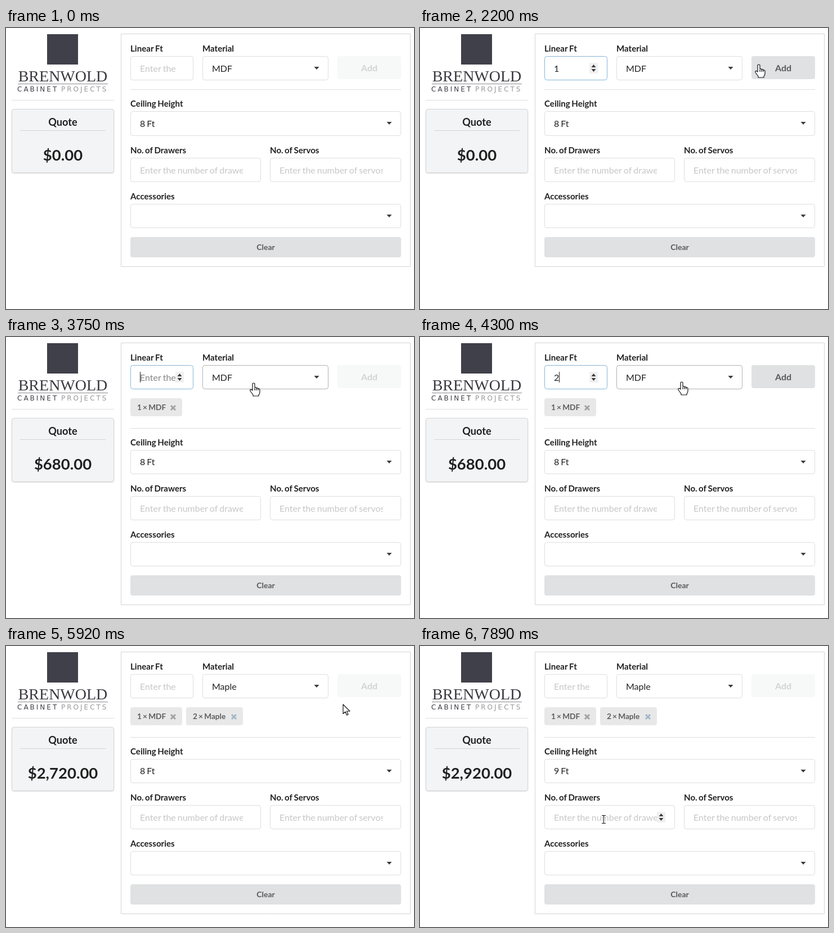
An HTML page with a canvas that plays this animation: 725 by 500 pixels, repeating every 8000 ms.

```html
<!DOCTYPE html>
<html lang="en">
<head>
<meta charset="utf-8">
<title>Cabinet quote</title>
<style>
html, body { margin: 0; width: 100%; height: 100%; overflow: hidden; background: #fff; }
canvas { display: block; }
</style>
</head>
<body>
<canvas id="stage" width="725" height="500"></canvas>
<script>
const ctx = document.getElementById('stage').getContext('2d');
const LOOP = 8000, TICK = 109.6, LAST = 72;
const INK = 'rgba(0,0,0,.87)', SOFT = 'rgba(0,0,0,.6)';
const LINE = 'rgba(34,36,38,.15)', HOVER = 'rgba(34,36,38,.35)', FOCUS = '#85b7d9', OPEN = '#96c8da';
const WOODS = ['MDF', 'Maple', 'Cherry', 'Walnut'];
const HEIGHTS = ['8 Ft', '9 Ft', '10 Ft'];

// Pointer hotspot: tick, x, y
const PATH = [
  [1, 400, 376], [4, 345, 248], [6, 305, 168], [8, 274, 83], [9, 274, 80],
  [14, 276, 80], [16, 370, 84], [20, 602, 65], [21, 624, 74], [24, 624, 74],
  [26, 450, 84], [28, 290, 80], [29, 274, 84], [32, 274, 84], [33, 375, 83],
  [34, 440, 82], [39, 465, 80], [42, 465, 80], [43, 470, 95], [46, 495, 164],
  [47, 495, 164], [50, 638, 78], [53, 638, 78], [55, 560, 130], [58, 400, 226],
  [59, 381, 231], [62, 381, 231], [64, 368, 245], [66, 340, 277], [67, 332, 288],
  [70, 332, 288], [72, 326, 308]
];
const CLICKS = [9, 22, 29, 40, 46, 52, 59, 69];

const HAND = new Path2D('M-2 13V2Q-2 0 0 0Q2 0 2 2V8Q5 7 5 9Q8 8 8 10Q11 9.5 11 12V16Q11 19 9 21V23H-1V21L-6 14Q-7 11 -4 11.5Z');
const ARROW = new Path2D('M0 0V16.5L4 13L6.5 19L9 18L6.5 12H12Z');

const lato = (size, weight = 400) => `${weight} ${size}px Lato, sans-serif`;
const between = (v, a, b) => v >= a && v < b;
const inside = (p, b) => p && between(p.x, b.x, b.x + b.w) && between(p.y, b.y, b.y + b.h);

function text(str, x, y, font, color = INK, align = 'left') {
  ctx.font = font;
  ctx.fillStyle = color;
  ctx.textAlign = align;
  ctx.fillText(str, x, y);
}

function fill(x, y, w, h, color, r = 0) {
  ctx.fillStyle = color;
  ctx.beginPath();
  ctx.roundRect(x, y, w, h, r);
  ctx.fill();
}

function frame(b, color, r = 4) {
  ctx.strokeStyle = color;
  ctx.lineWidth = 1;
  ctx.beginPath();
  ctx.roundRect(b.x + .5, b.y + .5, b.w - 1, b.h - 1, r);
  ctx.stroke();
}

function triangle(x, y, half, height) {
  ctx.fillStyle = '#3c3c3f';
  ctx.beginPath();
  ctx.moveTo(x - half, y);
  ctx.lineTo(x + half, y);
  ctx.lineTo(x, y + height);
  ctx.fill();
}

const label = (str, x, y) => text(str, x, y, lato(15.1, 700));

function pointerAt(n) {
  if (n < 1) return null;
  const i = PATH.findIndex(k => k[0] >= n);
  const b = PATH[i], a = PATH[Math.max(0, i - 1)];
  const f = b[0] === a[0] ? 0 : (n - a[0]) / (b[0] - a[0]);
  return { x: a[1] + (b[1] - a[1]) * f, y: a[2] + (b[2] - a[2]) * f };
}

function input(b, base, hint, value, p, focused, caret) {
  const right = b.x + b.w - 32;
  fill(b.x, b.y, b.w, b.h, '#fff', 4);
  frame(b, focused ? FOCUS : LINE);
  ctx.save();
  ctx.beginPath();
  ctx.rect(b.x + 17, b.y, right - b.x - 17, b.h);
  ctx.clip();
  const pale = focused || caret ? 'rgba(115,115,115,.87)' : 'rgba(191,191,191,.87)';
  text(value || hint, b.x + 17, base, lato(16), value ? INK : pale);
  ctx.restore();
  if (caret) fill(b.x + 17 + (value ? 9 : 0), base - 16, 1, 19, '#222');
  if (inside(p, b) || focused) {
    fill(right, base - 16, 15, 19, '#f0f0f0');
    triangle(right + 7.5, base - 8, 4, -5);
    triangle(right + 7.5, base - 5, 4, 5);
  }
}

function dropdown(b, base, value, p, open) {
  fill(b.x, b.y, b.w, b.h, '#fff', 4);
  frame(b, open ? OPEN : inside(p, b) ? HOVER : LINE);
  text(value, b.x + 17, base, lato(16), open ? 'rgba(0,0,0,.7)' : INK);
  triangle(b.x + b.w - 21, b.y + 19, 4.5, 5);
}

function menu(b, items, chosen, p) {
  const top = b.y + b.h - 1, m = { x: b.x, y: top, w: b.w, h: items.length * 37 + 1 };
  ctx.save();
  ctx.shadowColor = 'rgba(34,36,38,.2)';
  ctx.shadowBlur = 3;
  ctx.shadowOffsetY = 2;
  fill(m.x, m.y, m.w, m.h, '#fff', [0, 0, 4, 4]);
  ctx.restore();
  frame(m, OPEN, [0, 0, 4, 4]);
  items.forEach((name, i) => {
    const row = { x: m.x + 1, y: top + i * 37, w: m.w - 2, h: 37 };
    const on = name === chosen, hot = inside(p, row);
    fill(row.x, row.y, row.w, row.h, hot ? '#f2f2f2' : on ? '#f7f7f7' : '#fff');
    text(name, b.x + 17, row.y + 24, lato(14, on ? 700 : 400), on ? 'rgba(0,0,0,.95)' : INK);
  });
  return m;
}

function tag(str, x, w, cross) {
  fill(x, 109, w, 32, '#e8e8e8', 4);
  text(str, x + 12, 130, lato(13.7, 700), SOFT);
  const cx = x + w - 16, cy = 126;
  ctx.strokeStyle = cross;
  ctx.lineWidth = 3;
  ctx.beginPath();
  for (const s of [-1, 1]) {
    ctx.moveTo(cx - 4, cy - 4 * s);
    ctx.lineTo(cx + 4, cy + 4 * s);
  }
  ctx.stroke();
}

function button(b, str, base, size, hot, disabled) {
  ctx.globalAlpha = disabled ? .25 : 1;
  fill(b.x, b.y, b.w, b.h, hot && !disabled ? '#cacbcd' : '#e0e1e2', 4);
  text(str, b.x + b.w / 2, base, lato(size, 700), SOFT, 'center');
  ctx.globalAlpha = 1;
}

function brand() {
  fill(73, 11, 55, 54, '#40404a');
  text('BRENWOLD', 101, 95, '28px "Liberation Serif", serif', '#3a3a42', 'center');
  fill(21, 99, 160, 1, '#8c8c90');
  ctx.letterSpacing = '3px';
  text('CABINET', 20, 113, '12px "DejaVu Sans", sans-serif', '#3f3f47');
  text('PROJECTS', 98, 113, '12px "DejaVu Sans", sans-serif', '#98989c');
  ctx.letterSpacing = '0px';
  fill(10, 128, 182, 1, '#dededf');
}

function quote(amount) {
  ctx.save();
  ctx.shadowColor = 'rgba(34,36,38,.15)';
  ctx.shadowBlur = 2;
  ctx.shadowOffsetY = 1;
  fill(10, 144, 182, 114, '#f3f4f5', 4);
  ctx.restore();
  frame({ x: 10, y: 144, w: 182, h: 114 }, '#d4d4d5');
  text('Quote', 101, 174, lato(18.2, 700), INK, 'center');
  fill(25, 182, 152, 1, '#d4d4d5');
  text(amount, 101, 236, lato(27.5, 700), INK, 'center');
}

function pointer(p, kind, clicked) {
  ctx.save();
  ctx.translate(Math.round(p.x), Math.round(p.y));
  if (clicked) {
    ctx.fillStyle = 'rgba(255,255,0,.5)';
    ctx.beginPath();
    ctx.arc(0, 0, 10, 0, 7);
    ctx.fill();
  }
  if (kind === 'beam') {
    fill(0, -7, 1, 15, '#111');
    for (const y of [-7, 7]) {
      fill(-3, y, 3, 1, '#111');
      fill(1, y, 3, 1, '#111');
    }
  } else {
    const shape = kind === 'hand' ? HAND : ARROW;
    ctx.fillStyle = '#fff';
    ctx.strokeStyle = '#111';
    ctx.lineWidth = 1.2;
    ctx.lineJoin = 'round';
    ctx.fill(shape);
    ctx.stroke(shape);
    if (kind === 'hand') {
      ctx.beginPath();
      for (const x of [2, 5, 8]) {
        ctx.moveTo(x, 9);
        ctx.lineTo(x, 13);
      }
      ctx.stroke();
    }
  }
  ctx.restore();
}

function draw(t) {
  const n = Math.min(LAST, Math.floor((t + 20) / TICK));
  const p = pointerAt(n);
  const tags = n >= 53 ? 2 : n >= 23 ? 1 : 0;
  const dy = tags ? 52 : 0, dTop = tags ? 53 : 0;
  const amount = between(n, 13, 23) ? '1' : between(n, 37, 53) ? '2' : '';
  const wood = n >= 46 ? 'Maple' : 'MDF';
  const height = n >= 69 ? '9 Ft' : '8 Ft';
  const woodOpen = between(n, 41, 47), heightOpen = between(n, 60, 70);
  const focused = between(n, 10, 23) || between(n, 30, 40);
  const since = n >= 37 ? 37 : n >= 30 ? 30 : n >= 13 ? 13 : 9;
  const caret = (focused || n === 9) && (n - since) * TICK % 1060 < 530;
  const price = n >= 69 ? '$2,920.00' : tags === 2 ? '$2,720.00' : tags ? '$680.00' : '$0.00';

  const feet = { x: 221, y: 50, w: 112, h: 43 };
  const material = { x: 349, y: 50, w: 224, h: 43 };
  const add = { x: 589, y: 50, w: 113, h: 41 };
  const ceiling = { x: 221, y: 148 + dTop, w: 481, h: tags ? 43 : 44 };
  const drawers = { x: 221, y: 231 + dy, w: 232, h: 43 };
  const servos = { x: 469, y: 231 + dy, w: 233, h: 43 };
  const extras = { x: 221, y: 313 + dy, w: 481, h: 43 };
  const clear = { x: 221, y: 372 + dy, w: 481, h: 36 };
  const free = heightOpen || woodOpen ? null : p;

  fill(0, 0, 725, 500, '#fff');
  brand();
  ctx.wordSpacing = '-1.2px';
  quote(price);
  frame({ x: 204, y: 10, w: 515, h: 415 + dy }, '#d4d4d5', 0);

  label('Linear Ft', 221, 42);
  label('Material', 349, 42);
  input(feet, 78, 'Enter the linear feet', amount, p, focused, caret);
  dropdown(material, 78, wood, p, woodOpen);
  button(add, 'Add', 77, 16, inside(p, add) && n > 20, !amount);
  if (tags) tag('1 × MDF', 221, 92, '#a2a2a2');
  if (tags > 1) tag('2 × Maple', 320, 101, '#a3b7c8');
  fill(221, 109 + dTop, 481, 1, '#dededf');

  label('Ceiling Height', 221, 140 + dTop);
  dropdown(ceiling, 176 + dy, height, free || (heightOpen ? p : null), heightOpen);
  label('No. of Drawers', 221, 223 + dy);
  label('No. of Servos', 469, 223 + dy);
  input(drawers, 259 + dy, 'Enter the number of drawers', '', free);
  input(servos, 259 + dy, 'Enter the number of servos', '', free);
  label('Accessories', 221, 305 + dy);
  dropdown(extras, 341 + dy, '', free);
  button(clear, 'Clear', 395 + dy, 14, false);

  let list = null;
  if (woodOpen) list = menu(material, WOODS, wood, p);
  if (heightOpen) list = menu(ceiling, HEIGHTS, height, p);
  if (!p) return;
  const over = boxes => boxes.some(b => inside(p, b));
  const kind = list && inside(p, list) || over([material, add, ceiling, extras, clear]) ? 'hand'
    : over([feet, drawers, servos]) ? 'beam' : 'arrow';
  pointer(p, kind, CLICKS.includes(n));
}

function loop() {
  draw(performance.now() % LOOP);
  requestAnimationFrame(loop);
}
loop();
</script>
</body>
</html>
```
